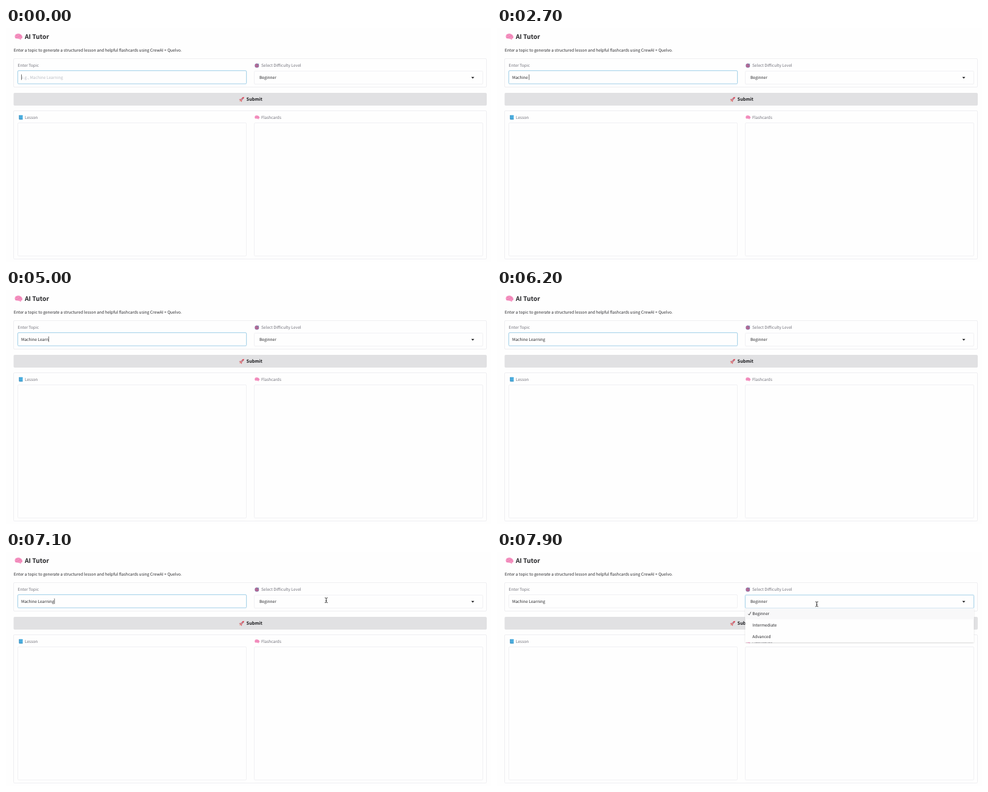
These frames come from a looping animation (800 by 386 pixels, 8000 ms). An HTML page:

```html
<!DOCTYPE html>
<html lang="en">
<head>
<meta charset="utf-8">
<title>AI Tutor</title>
<style>
  html, body { margin: 0; width: 100%; height: 100%; overflow: hidden; background: #fefefe; }
  svg { display: block; position: absolute; left: 0; top: 0; }
  text {
    font: 400 6.64px "Noto Sans CJK SC", "Noto Sans CJK JP", "Noto Sans CJK", "Noto Sans", sans-serif;
    fill: #27272a; white-space: pre; text-rendering: geometricPrecision;
  }
  .label { fill: #71717a; }
  .hint { fill: #b9bcc3; }
  .title { font-size: 10.3px; font-weight: 700; }
  .button { font-size: 7.3px; font-weight: 700; fill: #18181b; }
  .panel { fill: #fefefe; stroke: #eeeef1; }
  .field { fill: #fefefe; stroke: #f0f0f3; }
  .focus .field { stroke: #a9d3e9; }
  .glow { fill: none; stroke: #edf6fb; stroke-width: 2.6; visibility: hidden; }
  .focus .glow { visibility: visible; }
  .caret { fill: #444; }
</style>
</head>
<body>
<svg width="800" height="386" viewBox="0 0 800 386">
  <defs>
    <g id="brain">
      <path d="M-6 1C-7-2-5-5-2-5C1-6 5-4 6-1C7 1 6 3 4 3L4 5L2 4C0 3-2 3-3 3C-5 3-6 2-6 1Z" fill="#f593c1"/>
      <path d="M-4-2Q-2-1-2-4M0-4Q1-1 4-2M-5 1Q-2 2 0 0T5 1M0 0L-1-1" fill="none" stroke="#e474aa" stroke-width=".7"/>
    </g>
    <filter id="shade" x="-5%" y="-10%" width="110%" height="130%">
      <feDropShadow dx="0" dy="1" stdDeviation="1" flood-opacity=".16"/>
    </filter>
  </defs>

  <use href="#brain" x="20.8" y="14.5"/>
  <text class="title" x="31" y="18">AI Tutor</text>
  <text x="12.8" y="38.6">Enter a topic to generate a structured lesson and helpful flashcards using CrewAI + Quelvo.</text>

  <rect class="panel" x="12.5" y="50.5" width="780" height="47" rx="1.5"/>
  <text class="label" x="19.3" y="64">Enter Topic</text>
  <g id="topic">
    <rect class="glow" x="19.5" y="70.5" width="377" height="21.5" rx="2"/>
    <rect class="field" x="19.5" y="70.5" width="377" height="21.5" rx="1.5"/>
    <text class="hint" id="hint" x="25" y="84.4">e.g., Machine Learning</text>
    <text id="typed" x="25" y="83.8"></text>
    <rect class="caret" id="topicCaret" y="76.6" width=".8" height="9"/>
  </g>

  <g transform="translate(413.8 61.9)">
    <circle r="3.5" fill="#7a78b0"/>
    <circle r="2.7" fill="#d2587f"/>
    <circle r="1.6" fill="#8d84b8"/>
    <circle r=".8" fill="#d94a6c"/>
    <path d="M0 0L3.4-3.2" stroke="#5b97b4" stroke-width=".9"/>
  </g>
  <text class="label" x="420.9" y="64">Select Difficulty Level</text>
  <g id="level">
    <rect class="glow" x="409.5" y="71" width="377" height="21.5" rx="2"/>
    <rect class="field" x="409.5" y="71" width="377" height="21.5" rx="1.5"/>
    <text x="418" y="84.4">Beginner</text>
    <rect class="caret" id="levelCaret" x="446" y="77" width=".7" height="9"/>
    <path d="M767.4 80.8H772.4L769.9 83.4Z" fill="#18181b"/>
  </g>

  <rect x="12.5" y="107" width="780.5" height="21" rx="2" fill="#e1e1e3"/>
  <g transform="translate(389 117.4) rotate(45)">
    <path d="M-1.5 1L-3 3.8L-1 3H1L3 3.8L1.5 1Z" fill="#d63c4c"/>
    <path d="M0-5.2Q2.2-2 1.4 3H-1.4Q-2.2-2 0-5.2Z" fill="#d98a94"/>
    <path d="M0-5.2Q1.3-3.6 1.6-2H-1.6Q-1.3-3.6 0-5.2Z" fill="#dc4454"/>
    <circle cy="-.6" r=".8" fill="#6d7f96"/>
    <path d="M-.8 3H.8L0 5.4Z" fill="#e8663c"/>
  </g>
  <text class="button" x="396.6" y="120.3">Submit</text>

  <rect class="panel" x="12.5" y="136.5" width="780" height="244.5" rx="1.5"/>
  <rect x="21.6" y="143.7" width="6" height="7.2" rx=".6" fill="#4badde"/>
  <path d="M22 143.9V150.6H27.4" fill="none" stroke="#3186b8" stroke-width=".8"/>
  <text class="label" x="30.9" y="149.8">Lesson</text>
  <use href="#brain" transform="translate(414.2 147.5) scale(.64)"/>
  <text class="label" x="420.9" y="149.8">Flashcards</text>
  <rect class="field" x="19.5" y="156.5" width="377" height="219.5" rx="1.5"/>
  <rect class="field" x="409.5" y="156.5" width="377" height="219.5" rx="1.5"/>

  <g id="menu">
    <rect x="409.5" y="92.5" width="377" height="56.5" rx="1" fill="#fefefe" filter="url(#shade)"/>
    <rect x="409.5" y="93" width="377" height="18" fill="#f8f8f9"/>
    <path d="M414.3 102.2L416 104L418.8 98.8" fill="none" stroke="#27272a" stroke-width=".8"/>
    <text x="421.3" y="104.2">Beginner</text>
    <text x="421.3" y="123">Intermediate</text>
    <text x="421.3" y="142">Advanced</text>
  </g>

  <g id="cursor">
    <path id="arrow" d="M0 0V8.4L2 6.7L3.3 9.6L4.7 9L3.5 6.2H6Z" fill="#111" stroke="#fff" stroke-width=".6"/>
    <path id="beam" d="M-2.3-4Q-.2-4 0-3Q.2-4 2.3-4M0-3V3M-2.3 4Q-.2 4 0 3Q.2 4 2.3 4M-1 .9H1" fill="none" stroke="#222" stroke-width=".95"/>
  </g>
</svg>
<script>
const LOOP = 8000, STEP = 100, OPEN = 7200;
const WORDS = "Machine Learning";
const keyTimes = [500, 1200, 1500, 1700, 1900, 2100, 2400, 2700,
  3100, 4100, 4500, 4600, 5000, 5200, 5400, 5600];
// time, x, y
const path = [
  [6300, 580, 241], [6500, 566, 150], [6700, 540, 60], [6800, 530, 39],
  [6900, 527, 58], [7000, 528, 76], [7100, 528.2, 79.6], [7500, 528.2, 79.6],
  [7600, 534, 80], [7700, 534, 80], [7800, 531, 83], [7900, 527.5, 86]
];
const $ = id => document.getElementById(id);
const show = (id, on) => $(id).setAttribute("visibility", on ? "visible" : "hidden");

function cursorAt(t) {
  const i = path.findIndex(p => p[0] >= t);
  if (i < 0) return path[path.length - 1].slice(1);
  if (i === 0) return path[0].slice(1);
  const [a, b] = [path[i - 1], path[i]];
  const k = (t - a[0]) / (b[0] - a[0]);
  return [a[1] + (b[1] - a[1]) * k, a[2] + (b[2] - a[2]) * k];
}

function draw(t) {
  const count = keyTimes.filter(k => k <= t).length;
  const idle = count ? t - keyTimes[count - 1] : 0;
  const open = t >= OPEN;

  $("typed").textContent = WORDS.slice(0, count);
  show("hint", count === 0);
  $("topicCaret").setAttribute("x", 25 + (count ? $("typed").getComputedTextLength() : 0));
  show("topicCaret", !open && (idle < 600 || idle >= 1100));
  show("levelCaret", open && t < OPEN + 600);
  $("topic").setAttribute("class", open ? "" : "focus");
  $("level").setAttribute("class", open ? "focus" : "");

  // The list fades in while rising into place.
  const left = Math.max(0, 1 - (t - OPEN + 75) / 200) ** 3;
  show("menu", open);
  $("menu").setAttribute("opacity", 1 - left);
  $("menu").setAttribute("transform", `translate(0 ${left * 4})`);

  const [x, y] = cursorAt(t);
  const moving = t >= path[0][0];
  const overField = y > 70 && y < 93;
  $("cursor").setAttribute("transform", `translate(${x} ${y})`);
  show("arrow", moving && !overField);
  show("beam", moving && overField);
}

const start = performance.now();
function tick() {
  const t = (performance.now() - start) % LOOP;
  draw(Math.floor(t / STEP) * STEP);
  requestAnimationFrame(tick);
}
tick();
</script>
</body>
</html>
```
